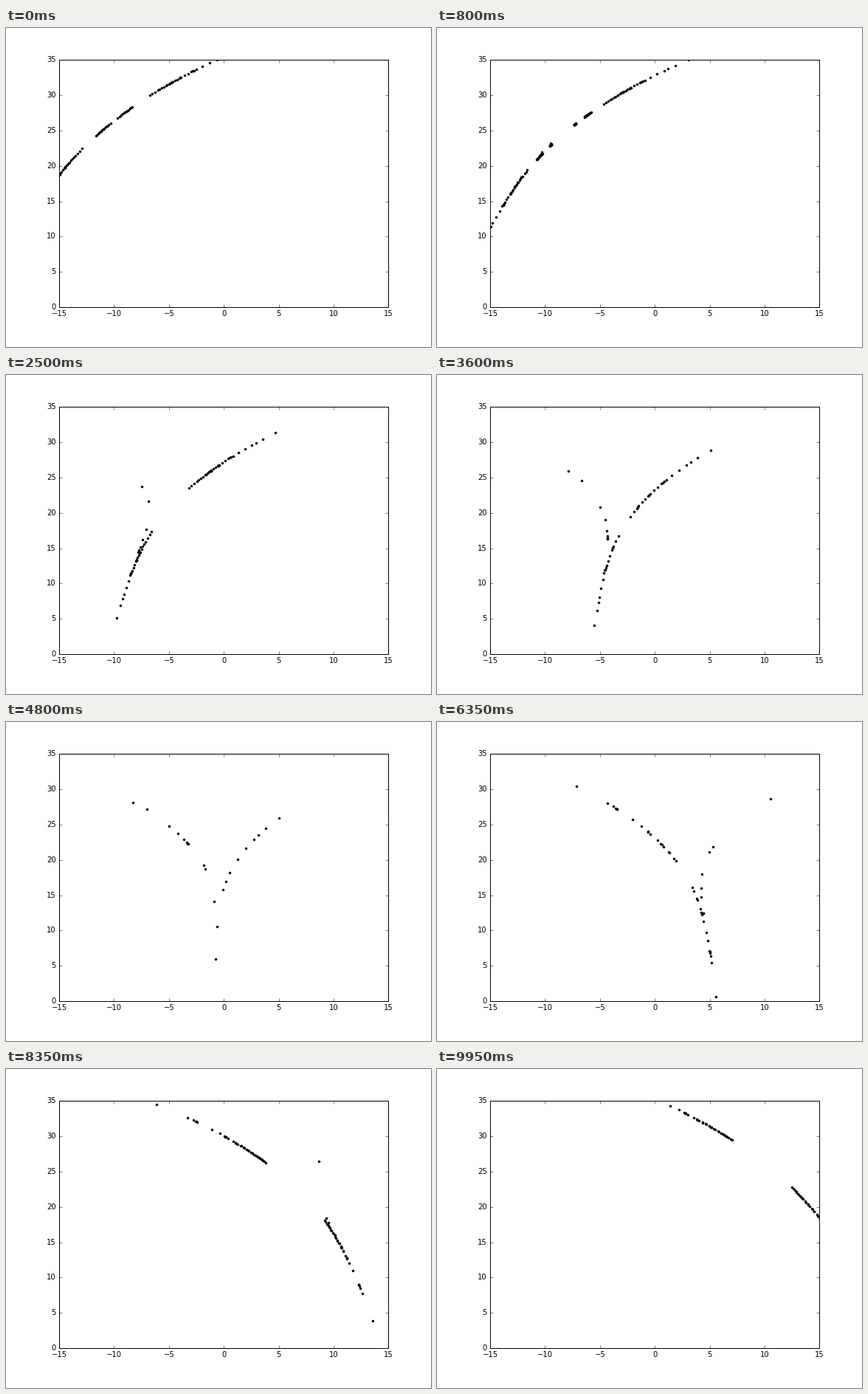
A matplotlib script that plays this animation: 576 by 432 pixels, repeating every 10000 ms.

```python
import numpy as np
import matplotlib.pyplot as plt
from matplotlib.animation import FuncAnimation

# Section of the Lorenz attractor by a plane x = const that sweeps to the right.
SIGMA, RHO, BETA = 10.0, 25.0, 8.0 / 3.0
FRAMES, INTERVAL = 200, 50
X_START, X_STEP = -10.0, 0.1
X_MID = X_START + X_STEP * 96
DT, SPAN = 0.0025, 11.0

# One orbit leaves the origin, the others begin on the middle plane.
ORIGIN = (1.0, 0.0, 0.0)
MID_STARTS = [(-8.28, 28.1), (-4.98, 24.75), (-1.8, 19.2),
              (0.4, 18.0), (2.0, 21.7), (5.5, 26.2), (11.03, 30.75)]


def flow(p):
    x, y, z = p.T
    return np.stack([SIGMA * (y - x), x * (RHO - z) - y, x * y - BETA * z], axis=1)


def rk4(p):
    a = flow(p)
    b = flow(p + DT / 2 * a)
    c = flow(p + DT / 2 * b)
    d = flow(p + DT * c)
    return p + DT / 6 * (a + 2 * b + 2 * c + d)


def trace(starts):
    path = [np.array(starts)]
    for _ in range(int(SPAN / DT)):
        path.append(rk4(path[-1]))
    return np.array(path)


path = trace([ORIGIN] + [(X_MID, y, z) for y, z in MID_STARTS])


def section(i):
    """(y, z) of every crossing of the plane, interpolated between steps."""
    gap = path[:, :, 0] - (X_START + X_STEP * i)
    a, b = gap[:-1], gap[1:]
    hit = (a >= 0) != (b >= 0)
    t = (a[hit] / (a[hit] - b[hit]))[:, None]
    p, q = path[:-1][hit], path[1:][hit]
    return (p + t * (q - p))[:, 1:]


plt.rcParams.update({
    "font.family": "DejaVu Sans", "font.size": 10,
    "axes.linewidth": 1.0, "ytick.alignment": "center",
    "xtick.labelsize": 10, "ytick.labelsize": 10,
})

fig = plt.figure(figsize=(8, 6), dpi=72, facecolor="white")
ax = fig.add_axes([0.125, 0.125, 0.775, 0.775])
ax.set_xlim(-15, 15)
ax.set_ylim(0, 35)
ax.set_xticks(np.arange(-15, 16, 5))
ax.set_yticks(np.arange(0, 36, 5))
ax.tick_params(direction="in", length=4, width=0.5, pad=4, top=True, right=True)
dots, = ax.plot([], [], "k.", markersize=6, markeredgewidth=0.5)


def draw(i):
    dots.set_data(*section(i).T)
    return dots,


anim = FuncAnimation(fig, draw, frames=FRAMES, interval=INTERVAL,
                     repeat=True, repeat_delay=0)
plt.show()
```
